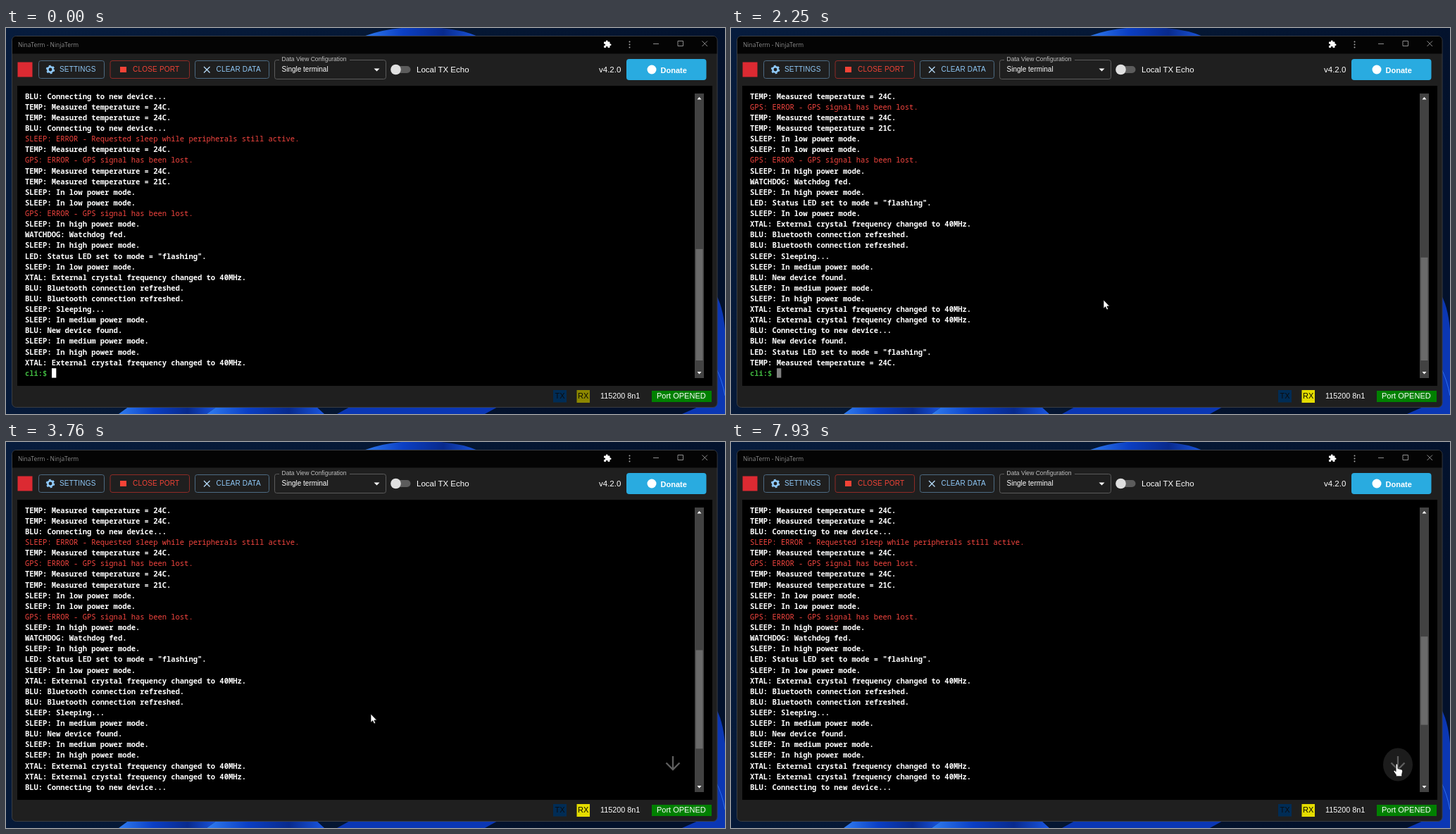
These frames come from a looping animation (1021 px wide and 548 px high, 7.99 s). An HTML page:

```html
<!DOCTYPE html>
<html lang="en">
<head>
<meta charset="utf-8">
<title>Serial terminal</title>
<style>
  html, body { margin: 0; width: 100%; height: 100%; overflow: hidden; background: #04152f; }
  svg { display: block; width: 1021px; height: 548px; font: 11px "Liberation Sans", Arial, sans-serif; }
  text { white-space: pre; }
  .button rect { fill: none; stroke: #4d6a82; }
  .button text { font-size: 10px; letter-spacing: .2px; fill: #90caf9; }
  .danger rect { stroke: #8f2b26; }
  .danger text { fill: #f44336; }
  #rows text { font: 600 10.47px "Noto Sans Mono", monospace; fill: #fff; }
  #rows .error { font-weight: 400; fill: #f4453f; }
  #rows .prompt { fill: #3fb53f; }
</style>
</head>
<body>
<svg viewBox="0 0 1021 548">
  <defs>
    <clipPath id="view"><rect x="20" y="92" width="950" height="406"/></clipPath>
    <linearGradient id="night" x2="1" y2=".3">
      <stop stop-color="#071c3d"/><stop offset=".6" stop-color="#051733"/><stop offset="1" stop-color="#03112b"/>
    </linearGradient>
    <linearGradient id="petal">
      <stop stop-color="#2f7cf0"/><stop offset=".35" stop-color="#0b3fc4"/>
      <stop offset=".7" stop-color="#082a8c"/><stop offset="1" stop-color="#1a56e0"/>
    </linearGradient>
  </defs>

  <!-- Wallpaper -->
  <rect width="1021" height="548" fill="url(#night)"/>
  <path d="M507 12Q535 2 562 0H618Q650 3 670 12Z" fill="url(#petal)"/>
  <path d="M1008 378Q1018 395 1021 428V548H1008Z" fill="#0b37b4"/>
  <path d="M1008 482Q1017 500 1021 522" fill="none" stroke="#2c6cf0"/>
  <path d="M160 548L175 537H300L285 548Z" fill="url(#petal)"/>
  <path d="M285 548L300 537H440L452 548Z" fill="url(#petal)"/>
  <path d="M470 548L490 537H700L680 548Z" fill="#0b37b4"/>
  <path d="M960 548L985 537H1021V548Z" fill="#0b37b4"/>

  <!-- Window -->
  <rect x="8.5" y="11.5" width="1001.5" height="527" rx="6" fill="#1f1f1f" stroke="#3a3d42"/>
  <path d="M9 36.500V17.500Q9 12 14.500 12H1004Q1009.500 12 1009.500 17.500V36.500Z" fill="#040404"/>
  <text x="17" y="27" fill="#8b8b8b" style="font: 8.45px 'Open Sans', sans-serif">NinaTerm - NinjaTerm</text>
  <path transform="translate(848 17) scale(.5)" fill="#fff" d="M20.500 11H19V7c0-1.100-.9-2-2-2h-4V3.500a2.500 2.500 0 0 0-5 0V5H4c-1.100 0-2 .9-2 2v3.800h1.500a2.700 2.700 0 0 1 0 5.400H2V20c0 1.100.9 2 2 2h3.800v-1.500a2.700 2.700 0 0 1 5.400 0V22H17c1.100 0 2-.9 2-2v-4h1.500a2.500 2.500 0 0 0 0-5z"/>
  <g fill="#aaa"><circle cx="885.5" cy="19.5" r="1"/><circle cx="885.5" cy="23.5" r="1"/><circle cx="885.5" cy="27.5" r="1"/></g>
  <path d="M919 22.500H927M954 18.500H961.500V25.500H954ZM988.500 18.500L996 26M996 18.500L988.500 26" fill="none" stroke="#8d8d8d"/>

  <!-- Toolbar -->
  <rect x="16.5" y="48.5" width="21" height="21" fill="#dc2a32"/>
  <g class="button">
    <rect x="46.5" y="46.5" width="93" height="25" rx="3"/>
    <circle cx="63" cy="59" r="3.7" fill="none" stroke="#90caf9" stroke-width="2.6"/>
    <circle cx="63" cy="59" r="5.4" fill="none" stroke="#90caf9" stroke-width="1.7" stroke-dasharray="2.828"/>
    <text x="76" y="62">SETTINGS</text>
  </g>
  <g class="button danger">
    <rect x="148" y="46.5" width="112.5" height="25" rx="3"/>
    <path d="M162 55h9v8h-9z" fill="#f44336"/>
    <text x="180" y="62">CLOSE PORT</text>
  </g>
  <g class="button">
    <rect x="268.5" y="46.5" width="105" height="25" rx="3"/>
    <path d="M281 55L289.500 63.500M289.500 55L281 63.500" stroke="#b7dcfa" stroke-width="1.3"/>
    <text x="298.5" y="62">CLEAR DATA</text>
  </g>
  <rect x="381.5" y="45.5" width="158" height="27" rx="3" fill="none" stroke="#5b5b5b"/>
  <path d="M388 43h100v5H388z" fill="#1f1f1f"/>
  <text x="391.5" y="47" font-size="8.55" fill="#c0c0c0">Data View Configuration</text>
  <text x="391.5" y="62" font-size="10" fill="#fff">Single terminal</text>
  <path d="M522.500 57.500h8l-4 4z" fill="#fff"/>
  <rect x="548" y="54" width="26.5" height="10" rx="5" fill="#5c5c5c"/>
  <circle cx="553.5" cy="59" r="7.3" fill="#e0e0e0"/>
  <g fill="#fff" font-size="11.5">
    <text x="583" y="63">Local TX Echo</text>
    <text x="842" y="63">v4.2.0</text>
  </g>
  <rect x="881" y="44" width="113.5" height="30" rx="4" fill="#29abe0"/>
  <circle cx="917" cy="59" r="6.5" fill="#fff"/>
  <text x="929.5" y="63.5" font-weight="700" fill="#fff">Donate</text>

  <!-- Terminal -->
  <path d="M16 82h987v426H16z"/>
  <g clip-path="url(#view)">
    <g id="rows"></g>
  </g>
  <path d="M978 93h13v404h-13z" fill="#424242"/>
  <rect id="thumb" x="979.5" width="10" fill="#6a6a6a"/>
  <path d="M981.500 101.500h6l-3-3.500zM981.500 488h6l-3 3.500z" fill="#fff"/>
  <g id="down">
    <ellipse id="hover" cx="947" cy="458" rx="21" ry="23.5" fill="#1c1c1c"/>
    <path d="M947 446V464.500M937.500 455.500L947 465L956.500 455.500" fill="none" stroke="#5f5f5f" stroke-width="2.3"/>
  </g>

  <!-- Status bar -->
  <path d="M777 514h19v17.500h-19z" fill="#002c55"/>
  <rect id="rx" x="810.5" y="514" width="18.5" height="18"/>
  <text x="779.5" y="526" fill="#0b0d10">TX</text>
  <text x="812" y="526" fill="#0b0b00">RX</text>
  <path d="M917 515h85v16h-85z" fill="#008000"/>
  <g fill="#fff">
    <text x="844" y="526" font-size="10.8">115200 8n1</text>
    <text x="924" y="526">Port OPENED</text>
  </g>

  <!-- Pointers, each with its hot spot at 0,0 -->
  <path id="arrow" d="M0 0V12.200L2.800 9.700L4.700 14L6.700 13.100L4.900 9H8.600Z" fill="#fff" stroke="#000" stroke-width=".7"/>
  <path id="beam" d="M-2.500-6H-.7L0-5.300L.7-6H2.500M0-5.300V5.300M-2.500 6H-.7L0 5.300L.7 6H2.500" fill="none" stroke="#fff"/>
  <path id="hand" d="M-1.400 1.100Q0-1.100 1.400 1.100V6.600L6.700 8Q8.300 8.500 8.100 10.500L7.200 15V17.700H-1.100V15.500L-4.500 10.800Q-4.800 8.900-3 9.200L-1.400 10.800Z" fill="#fff" stroke="#000" stroke-width=".7"/>
</svg>
<script>
const LOOP = 7990, ROW = 15.115, TOP = 100.8;
const LINE_PERIOD = 500, LINE_PHASE = 265;
const FIRST_ROWS = 26, HIDDEN_ROWS = 34.6, VIEW_ROWS = 26.7;
const SCROLL_START = 3090, SCROLL_TIME = 270;

const messages = {
  c: 'BLU: Connecting to new device...',
  n: 'BLU: New device found.',
  b: 'BLU: Bluetooth connection refreshed.',
  t: 'TEMP: Measured temperature = 24C.',
  u: 'TEMP: Measured temperature = 21C.',
  l: 'SLEEP: In low power mode.',
  m: 'SLEEP: In medium power mode.',
  h: 'SLEEP: In high power mode.',
  s: 'SLEEP: Sleeping...',
  w: 'WATCHDOG: Watchdog fed.',
  f: 'LED: Status LED set to mode = "flashing".',
  x: 'XTAL: External crystal frequency changed to 40MHz.',
  E: 'SLEEP: ERROR - Requested sleep while peripherals still active.',
  G: 'GPS: ERROR - GPS signal has been lost.'
};
const log = [...'cttcEtGtullGhwhflxbbsmnmhxxcnfth'];

// Pointer path: time, x, y
const path = [
  [800, 927, 527], [1760, 927, 527], [2000, 720, 440], [2180, 529, 386], [2600, 529, 386],
  [3000, 518, 386], [4240, 518, 386], [4800, 488, 378], [5850, 488, 378], [6300, 540, 384],
  [6360, 543.5, 384], [6500, 636, 402], [6630, 757, 422], [6760, 838, 434], [6900, 918, 451],
  [7000, 945.5, 457], [LOOP, 945.5, 457]
];

const $ = id => document.getElementById(id);
const clamp = v => Math.min(1, Math.max(0, v));
const set = (el, attrs) => { for (const k in attrs) el.setAttribute(k, attrs[k]); };

function add(tag, attrs, text = '') {
  const el = document.createElementNS('http://www.w3.org/2000/svg', tag);
  set(el, attrs);
  el.textContent = text;
  return $('rows').appendChild(el);
}

const rows = log.map((key, i) =>
  add('text', { x: 27, y: TOP + i * ROW, class: key < 'a' ? 'error' : '' }, messages[key]));
const prompt = add('text', { x: 27, class: 'prompt' }, 'cli:$');
const caret = add('rect', { x: 65, width: 6.3, height: 13.5, fill: '#fff' });

function pointerAt(t) {
  const i = path.findIndex(p => p[0] > t);
  if (i < 1) return null;
  const [t0, x0, y0] = path[i - 1], [t1, x1, y1] = path[i];
  const k = (t - t0) / (t1 - t0);
  return [x0 + (x1 - x0) * k, y0 + (y1 - y0) * k];
}

function drawPointer(t) {
  const at = pointerAt(t);
  let shape = '';
  if (at) {
    const [x, y] = at;
    const overLabel = x > 917 && y > 515;
    const overButton = Math.hypot(x - 947, y - 458) < 22;
    shape = overLabel ? 'beam' : overButton ? 'hand' : 'arrow';
    set($(shape), { transform: `translate(${x} ${y})` });
  }
  for (const id of ['arrow', 'beam', 'hand']) set($(id), { opacity: +(id === shape) });
}

function draw(t) {
  const arrived = Math.floor((t + LINE_PHASE) / LINE_PERIOD);
  const age = (t + LINE_PHASE) % LINE_PERIOD;
  const p = clamp((t - SCROLL_START) / SCROLL_TIME);
  const top = t < SCROLL_START ? arrived : 6 - 5 * p * p * (3 - 2 * p);

  set($('rows'), { transform: `translate(0 ${-top * ROW})` });
  rows.forEach((row, i) => set(row, { opacity: +(i < FIRST_ROWS + arrived) }));
  const promptY = TOP + (FIRST_ROWS + arrived) * ROW;
  set(prompt, { y: promptY });
  set(caret, { y: promptY - 10.7, opacity: .5 + .5 * clamp((age - 20) / 80) });

  const total = HIDDEN_ROWS + VIEW_ROWS + arrived;
  set($('thumb'), { y: 109 + 363 * (HIDDEN_ROWS + top) / total, height: 363 * VIEW_ROWS / total });
  set($('rx'), { fill: age < 210 ? '#e4dc00' : '#8c8700' });
  set($('down'), { opacity: +(t >= SCROLL_START) });
  set($('hover'), { opacity: clamp((t - 6920) / 200) });
  drawPointer(t);
}

function tick() {
  draw(performance.now() % LOOP);
  requestAnimationFrame(tick);
}
tick();
</script>
</body>
</html>
```
